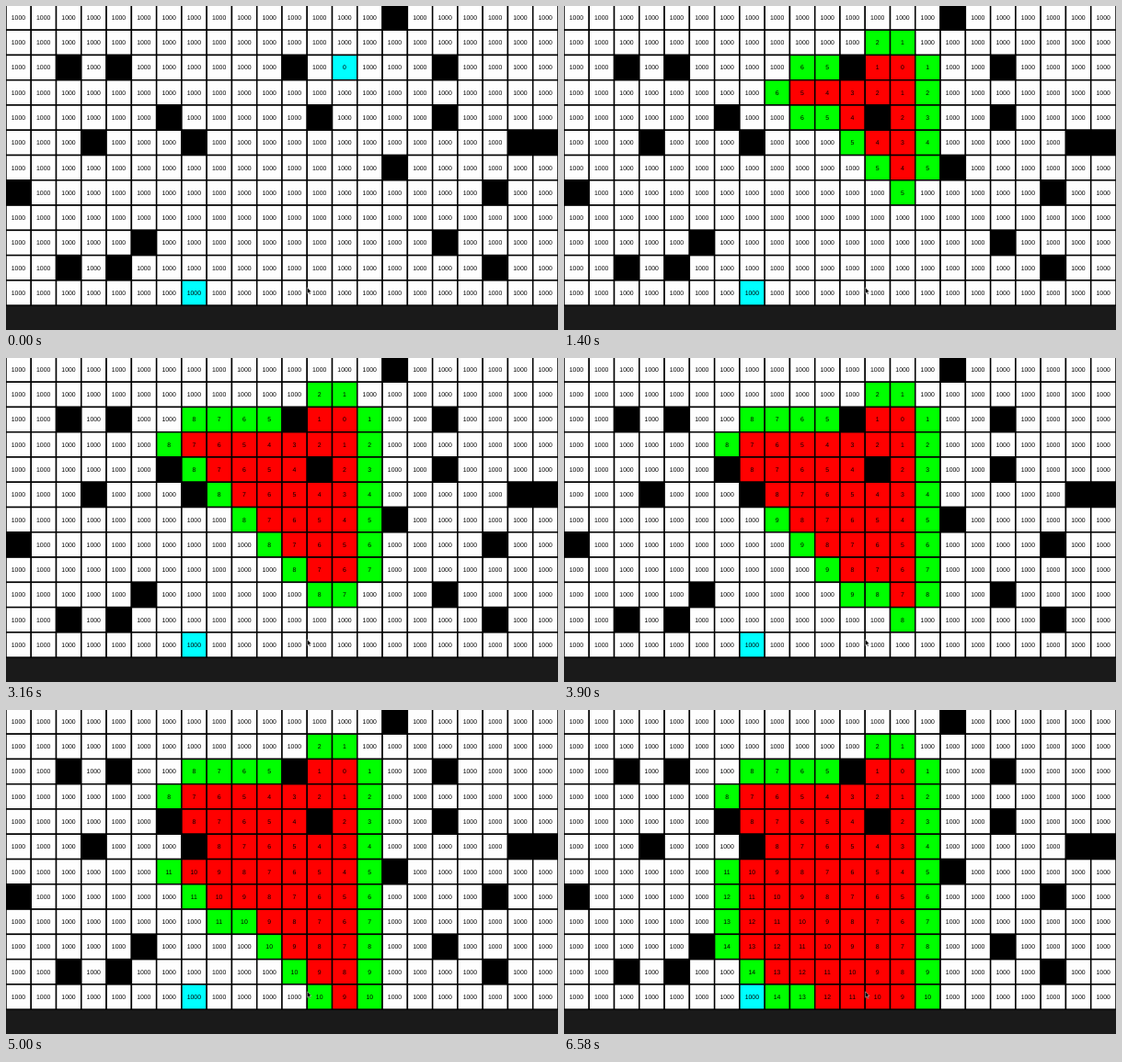
Write an HTML page that moves like this. It is 600 px wide and 353 px high and loops after 6.6 s.

```html
<!DOCTYPE html>
<html lang="en">
<head>
<meta charset="utf-8">
<title>Grid path search</title>
<style>
  html, body { margin: 0; width: 100%; height: 100%; overflow: hidden; background: #1a1a1a; }
  svg { display: block; width: 600px; height: 353px; }
  rect { stroke: #000; stroke-width: 1.5px; }
  text {
    font: 6.9px "Liberation Sans", Arial, sans-serif;
    text-anchor: middle;
    text-rendering: geometricPrecision;
  }
</style>
</head>
<body>
<svg id="stage" viewBox="0 0 600 353"></svg>
<script>
const COLS = 22, ROWS = 12, SIZE = 600 / COLS, TOP = -1.1;
const LOOP = 6600, TICK = 20, STEP = 111.47, STEPS = 59;
const FAR = 1000;
const START = { x: 13, y: 2 }, GOAL = { x: 7, y: 11 };
const COLOR = { free: "#fefefe", wall: "#000", end: "#0ff", open: "#0f0", closed: "#f00" };

// Wall columns by row
const WALLS = {
  0: [15], 2: [2, 4, 11, 17], 4: [6, 12, 17], 5: [3, 7, 20, 21], 6: [15],
  7: [0, 19], 9: [5, 17], 10: [2, 4, 19]
};

const stage = document.getElementById("stage");

function add(tag, attrs) {
  const el = document.createElementNS("http://www.w3.org/2000/svg", tag);
  for (const key in attrs) el.setAttribute(key, attrs[key]);
  return stage.appendChild(el);
}

function makeCell(x, y) {
  const wall = (WALLS[y] || []).includes(x);
  const left = x * SIZE, top = TOP + y * SIZE;
  const rect = add("rect", { x: left, y: top, width: SIZE, height: SIZE });
  const label = wall ? null : add("text", { x: left + SIZE / 2 - 0.2, y: top + SIZE / 2 + 2.4 });
  return { x, y, wall, rect, label, g: FAR, openAt: Infinity, closedAt: Infinity };
}

const cells = [];
for (let y = 0; y < ROWS; y++)
  for (let x = 0; x < COLS; x++) cells.push(makeCell(x, y));

const cellAt = (x, y) =>
  x < 0 || y < 0 || x >= COLS || y >= ROWS ? null : cells[y * COLS + x];
const start = cellAt(START.x, START.y), goal = cellAt(GOAL.x, GOAL.y);

// A* with Manhattan distance; ties go to the cell found first
function search() {
  const score = c => c.g + Math.abs(c.x - goal.x) + Math.abs(c.y - goal.y);
  const open = [start];
  start.g = 0;
  start.openAt = 0;
  for (let step = 1; step <= STEPS; step++) {
    const cell = open.reduce((best, c) => score(c) < score(best) ? c : best);
    open.splice(open.indexOf(cell), 1);
    cell.closedAt = step;
    for (const [dx, dy] of [[-1, 0], [0, 1], [1, 0], [0, -1]]) {
      const next = cellAt(cell.x + dx, cell.y + dy);
      if (!next || next.wall || next.openAt < Infinity) continue;
      next.g = cell.g + 1;
      next.openAt = step;
      open.push(next);
    }
  }
}

function fillOf(cell, step) {
  if (cell.wall) return COLOR.wall;
  if (cell === goal) return COLOR.end;
  if (step >= cell.closedAt) return COLOR.closed;
  if (cell === start) return COLOR.end;
  return step >= cell.openAt ? COLOR.open : COLOR.free;
}

function draw(step) {
  for (const cell of cells) {
    cell.rect.setAttribute("fill", fillOf(cell, step));
    if (cell.label) cell.label.textContent = step >= cell.openAt ? cell.g : FAR;
  }
}

search();

// Mouse pointer
add("path", {
  d: "M327.6 306.8v6.4l1.5-1.3 1 2.3 1-.4-1-2.3h1.9z",
  fill: "#000", stroke: "#fff", "stroke-width": 0.4
});

const began = performance.now();
let shown = -1;

function frame() {
  const time = (performance.now() - began) % LOOP;
  const step = Math.floor(Math.floor(time / TICK) * TICK / STEP);
  if (step !== shown) draw(shown = step);
  requestAnimationFrame(frame);
}
frame();
</script>
</body>
</html>
```
